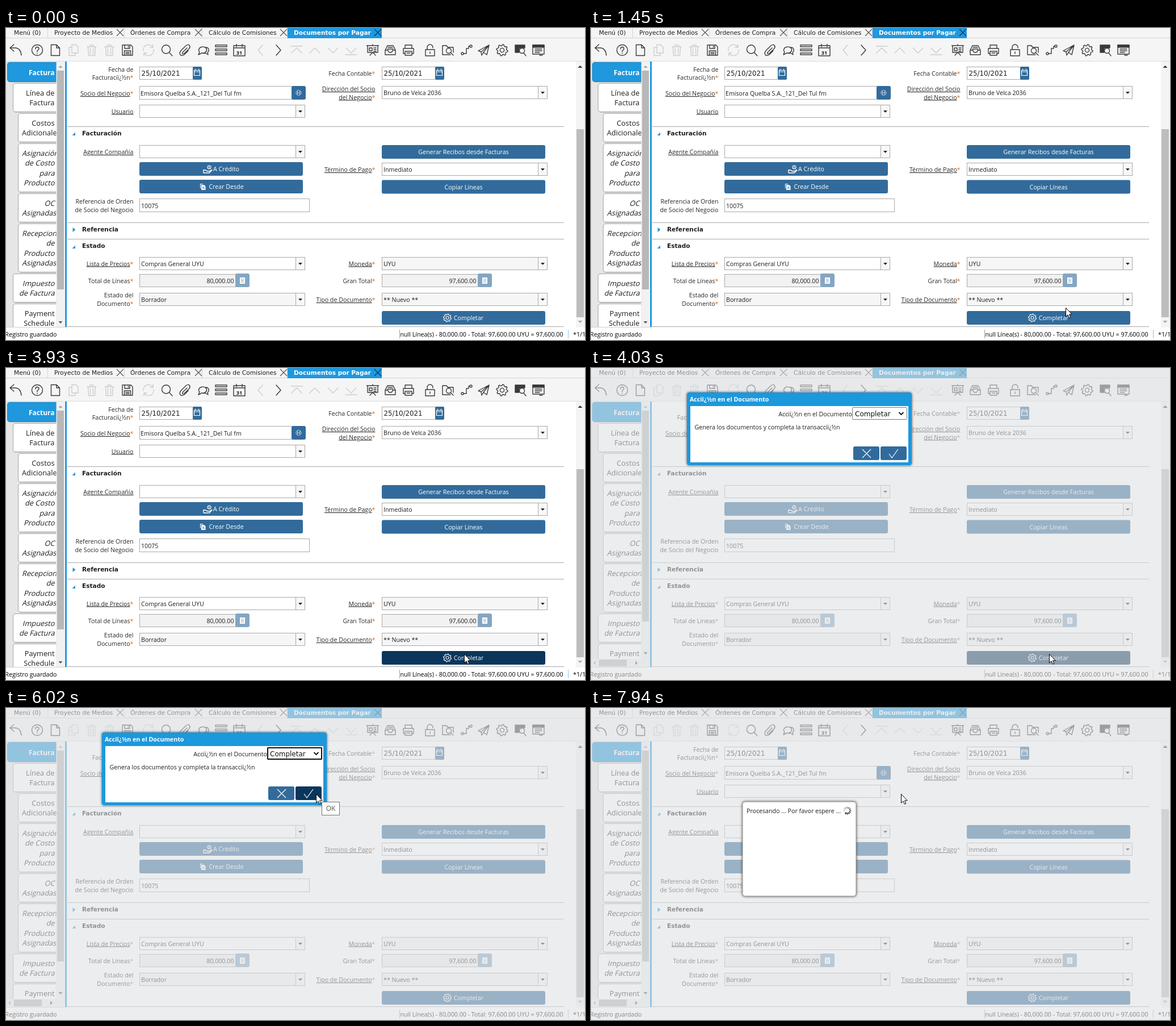
These frames come from a looping animation (1020 px wide and 549 px high, 8 s). An HTML page:

```html
<!DOCTYPE html>
<html lang="es">
<head>
<meta charset="utf-8">
<title>Documentos por Pagar</title>
<style>
html, body { margin: 0; width: 100%; height: 100%; overflow: hidden; background: #fff; }
svg { display: block; width: 1020px; height: 549px; }
text { font: 10.67px "Open Sans", "Noto Sans", sans-serif; fill: #1e1e1e; }
.dv { font-family: "DejaVu Sans", sans-serif; }
.ic path { stroke-width: 1.4; stroke-linejoin: round; stroke-linecap: round; }
</style>
</head>
<body>
<svg id="stage" viewBox="0 0 1020 549"></svg>
<script>
const BLUE = '#1f98dd', BTN = '#326b9b', HOVER = '#0b365c', PRESS = '#1b4c78';
const LINE = '#a9a9a9', INK = '#3a3a3a';

// ---- drawing helpers, each returns SVG markup ----
const rect = (x, y, w, h, fill, more = '') =>
  `<rect x="${x}" y="${y}" width="${w}" height="${h}" fill="${fill}" ${more}/>`;
const frame = (x, y, w, h, fill = '#fff', stroke = LINE) =>
  rect(x + .5, y + .5, w - 1, h - 1, fill, `stroke="${stroke}"`);
const path = (d, more = '') => `<path d="${d}" ${more}/>`;
const stroke = (d, color, w = 1) => path(d, `fill="none" stroke="${color}" stroke-width="${w}"`);
const circle = (x, y, r) => `M${x - r} ${y}a${r} ${r} 0 1 0 ${2 * r} 0a${r} ${r} 0 1 0 ${-2 * r} 0`;
const at = (x, y, body, more = '') => `<g transform="translate(${x} ${y})" ${more}>${body}</g>`;
const group = (id, body) => `<g id="${id}">${body}</g>`;

// italic text is the upright face, slanted
function text(x, y, str, o = {}) {
  const style = (o.size ? `font-size:${o.size}px;` : '') + (o.bold ? 'font-weight:700;' : '') +
    (o.fill ? `fill:${o.fill};` : '');
  return `<text transform="translate(${x} ${y})${o.italic ? ' skewX(-14)' : ''}" class="${o.dv ? 'dv' : ''}" text-anchor="${o.anchor || 'start'}" style="${style}">${str}</text>`;
}

function label(x, y, str, link, star) {
  const body = link ? `<tspan text-decoration="underline">${str}</tspan>` : str;
  return text(x, y, body + (star ? '<tspan style="fill:#e0701e">*</tspan>' : ''), { anchor: 'end', fill: '#2a2a2a' });
}

const arrow = (x, y, s, dir, fill) =>
  at(x, y, path(`M${-s} ${-s / 2}H${s}L0 ${s / 2}Z`, `fill="${fill}" transform="rotate(${dir})"`));

function combo(x, y, str = '', fill = '#fff') {
  return frame(x, y, 292, 23, fill) + frame(x + 275, y, 17, 23, '#f8f8f8') +
    arrow(x + 283.5, y + 12, 3.5, 0, '#111') + text(x + 3, y + 16, str);
}

const button = (x, y, str, mid = x + 144, id = '') =>
  rect(x, y, 288, 24, BTN, `rx="3" ${id && `id="${id}"`}`) +
  text(mid, y + 16, str, { fill: '#fff', anchor: 'middle' });

function gear(r) {
  let d = '';
  for (let i = 0; i < 32; i++) {
    const a = (i + .5) * Math.PI / 16, k = i % 4 < 2 ? r : r * .78;
    d += (i ? 'L' : 'M') + (k * Math.cos(a)).toFixed(1) + ' ' + (k * Math.sin(a)).toFixed(1);
  }
  return d + 'Z' + circle(0, 0, r * .36);
}

const close = (x, color) => stroke(`M${x - 6} 2l12 12m0-12l-12 12`, color, 1.2);

// ---- top tabs ----
function tabs() {
  const names = [[14, 'Menú (0)'], [85, 'Proyecto de Medios'], [219, 'Órdenes de Compra'], [357, 'Cálculo de Comisiones']];
  return rect(0, 0, 1020, 18, '#f5f5f5') + stroke('M0 17.5H1020', '#d5d5d5') +
    stroke('M73.500 0V17M208.500 0V17M345.500 0V17M495.500 0V17', '#d5d5d5') +
    names.map(([x, s]) => text(x, 12, s, { dv: 1, size: 10.6 })).join('') +
    [201, 339, 489].map(x => close(x, '#555')).join('') +
    rect(496, 0, 166, 18, BLUE) +
    text(507, 12, 'Documentos por Pagar', { dv: 1, bold: 1, size: 10.55, fill: '#fff' }) + close(655, '#0b365c');
}

// ---- toolbar: x, outline, disabled, solid part ----
const TRASH = 'M-8-6H8M-3-6V-9H3V-6M-6.500-6L-5.500 9.500H5.500L6.500-6M-2.500-3V7M2.500-3V7';
const UP = 'M-9 5L0-4L9 5', DOWN = 'M-9-4L0 5L9-4';
const ICONS = [
  [17, 'M-3-10L-10-4L-3 2M-10-4H0Q9-3 10 9'],
  [55, circle(0, 0, 9.5) + 'M-3-2Q-3-5.500 0-5.500T3-2.500Q3-1 0 1V3M0 5.500V6'],
  [87, 'M-7.500-9.500H2L7.500-4V9.500H-7.500ZM2-9.500V-4H7.500'],
  [119, 'M-3-9.500H4L8-5.500V5H-3ZM-3-5H-8V9.500H3V5', 1],
  [151, TRASH, 1], [182, TRASH, 1],
  [214, 'M-9-9H6L9-6V9H-9ZM-5-9V-3H4V-9M1.500-7V-5M-5.500 9V1H5.500V9M-3 4H3M-3 6.500H3'],
  [251, 'M-9 1A9 9 0 0 1 7-6M9-1A9 9 0 0 1-7 6M8-10V-5H3M-8 10V5H-3', 1],
  [283, circle(-1, -1.5, 7.5) + 'M4.500 4L10 10'],
  [315, 'M4-4L-4 4Q-5 6-3.500 6.500T0 5L8-3Q10-6 8-8.500T2-8L-7 1Q-10 5-8 8T-1 8L6 1'],
  [347, 'M-8 8L-6 3A7 5.500 0 1 1-2 5ZM5-5A5.500 5 0 0 1 8 4L9 8L4 5Q0 6-1 5'],
  [379, 'M-10-9H10V-6H-10ZM-10-2H10V1H-10ZM-10 5H10V8H-10Z'],
  [411, 'M-10-8H10V10H-10ZM-10-4H10M-5-10.500V-6M5-10.500V-6'],
  [449, 'M3-9L-5 0L3 9', 1], [480, 'M-4-9L4 0L-4 9'],
  [512, 'M-10-7H10' + UP, 1], [544, UP, 1], [576, DOWN, 1], [608, 'M-10 8H10' + DOWN, 1],
  [646, 'M-9-8H9V4H-9ZM-10.500-8H10.500M-5 9L0 4L5 9M0-10V-8M-6-4H-1V1H-6ZM2-4H6M2-1H6M2 2H6'],
  [677, 'M-9 0L-5-8H5L9 0V8H-9ZM-9 0H-4Q-4 4 0 4T4 0H9M-4-5H4M-5-2H5'],
  [709, 'M-6-3V-9H6V-3M-6 6H-9V-3H9V6H6M-6 2H6V9H-6ZM-3 5H3'],
  [747, 'M-8-1H8V10H-8ZM-5-1V-5A5 5 0 0 1 5-5V-4M0 3V6'],
  [779, 'M-10 8V-8H-3L-1-5H9V4M-10 8H4' + circle(1, 1, 4.5) + 'M4.500 4.500L9 9'],
  [811, circle(-7, 6, 2) + circle(8, -7, 2) + 'M-5 6H0V-3H4V-7H6'],
  [842, 'M-10 1L9-9L5 8L-1 4L-4 9L-5 3ZM-5 3L9-9L-1 4'],
  [874, gear(10)],
  [906, circle(3, 1, 4.5) + 'M6 5L10 10', 0, 'M-9-9H8V-4H-2V4H-9Z'],
  [938, 'M-10-9H10V7H-10ZM-6-2H6M-6 1H6M-6 4H2M2 9H7', 0, 'M-10-9H10V-5H-10Z'],
];
function icon([x, d, off, solid]) {
  const ink = off ? '#cdcdcd' : INK;
  return at(x, 39, path(d, 'fill="none"') + (solid ? path(solid, `fill="${ink}"`) : ''), `stroke="${ink}"`);
}
function toolbar() {
  return rect(0, 18, 1020, 41, '#f5f5f5') + stroke('M0 58.500H1020', '#dcdcdc') +
    `<g class="ic">${ICONS.map(icon).join('')}</g>` +
    text(411, 46.5, '31', { bold: 1, size: 9, anchor: 'middle' });
}

// ---- side panel: x, y, height, baseline, lines, italic ----
const SIDE = [
  [12, 97, 51, 119, ['Línea de', 'Factura']],
  [21, 150, 51, 172, ['Costos', 'Adicionales']],
  [21, 203, 86, 225, ['Asignación', 'de Costo', 'para', 'Producto'], 1],
  [21, 291, 51, 313, ['OC', 'Asignadas'], 1],
  [21, 344, 86, 366, ['Recepciones', 'de', 'Producto', 'Asignadas'], 1],
  [12, 432, 51, 454, ['Impuesto', 'de Factura'], 1],
  [12, 485, 51, 507, ['Payment', 'Schedule']],
];
function side() {
  const tab = (x, y, h, fill, line) =>
    path(`M95 ${y + .5}H${x + 5}q-4.500 0-4.500 4.500V${y + h - 5}q0 4.500 4.500 4.500H95Z`, `fill="${fill}" stroke="${line}"`);
  const long = /^(Adic|Asig|Recep)/;
  return `<g clip-path="url(#sideClip)">` + rect(0, 59, 89, 468, '#e6e6e6') +
    tab(3, 61, 35, '#bbb', '#ccc') + tab(2, 60, 35, BLUE, '#1784c4') +
    text(85.5, 83, 'Factura', { bold: 1, size: 12, fill: '#fff', anchor: 'end' }) +
    SIDE.map(([x, y, h, base, lines, italic]) => tab(x + 1, y + 1, h, '#ccc', '#c6c6c6') + tab(x, y, h, '#fff', '#a4a4a4') +
      lines.map((s, i) => long.test(s)
        ? text(28, base + i * 17.4, s, { size: 12.8, italic })
        : text(85.5, base + i * 17.4, s, { size: 12.8, italic, anchor: 'end' })).join('')).join('') + '</g>' +
    rect(89, 59, 14, 468, '#f1f1f1') + arrow(96, 68, 3.5, 180, '#999') +
    group('tallBar', rect(90, 75, 12, 385, '#b8b8b8') + arrow(96, 518, 3.5, 0, '#444')) +
    group('shortBar', rect(90, 75, 12, 371, '#b8b8b8') + arrow(96, 502, 3.5, 0, '#444') +
      rect(0, 512, 103, 15, '#f1f1f1') + rect(14, 513, 49, 12, '#b8b8b8') +
      arrow(6, 519, 3.5, 90, '#999') + arrow(80, 519, 3.5, 270, '#444')) +
    rect(104, 59, 3, 468, BLUE);
}

// ---- form ----
function dateField(x) {
  return frame(x, 68, 95, 23) + text(x + 3.5, 84, '25/10/2021', { dv: 1, size: 11.8 }) + rect(x + 94, 68, 16, 23, BTN, 'rx="2"') +
    stroke(`M${x + 96.5} 74.500h10v9h-10zm0 2.500h10m-8-5v2m6-2v2`, '#fff', 1.2);
}
function sum(x, str) {
  return frame(x, 433, 170, 23, '#f2f2f2') + text(x + 166.5, 449, str, { anchor: 'end' }) +
    rect(x + 169, 432, 25, 24, '#84a6c3', 'rx="3"') + rect(x + 177, 439, 9, 11, '#fff') +
    stroke(`M${x + 179} 442h5m-5 2.500h5m-5 2.500h5`, '#84a6c3', 1);
}
const title = (y, str) => text(134, y, str, { dv: 1, bold: 1, size: 10.55 });
function form() {
  const GREY = '#f6f6f6', L = 224.5, R = 650.5;
  return label(L, 76.5, 'Fecha de') + label(L, 91, 'Facturaciï¿½n', 0, 1) + dateField(235) +
    label(R, 84, 'Fecha Contable', 0, 1) + dateField(662) +
    label(L, 119, 'Socio del Negocio', 1, 1) + frame(235, 102, 270, 24) + text(237, 118.5, 'Emisora Quelba S.A._121_Del Tul fm') +
    rect(503, 102, 25, 24, BTN, 'rx="3"') + stroke(circle(515.5, 114, 4.5) + 'M513.500 111v6m4-6v6m-4-3h4', '#c9dbea', 1) +
    label(R, 111, 'Dirección del Socio', 1) + label(R, 125.5, 'del Negocio', 1, 1) + combo(662, 102, 'Bruno de Velca 2036') +
    label(L, 150.5, 'Usuario', 1) + combo(235, 135) +
    stroke('M108 173.500H983M108 342.500H983M108 371.500H983M108 525.500H983', LINE) +
    path('M122 183.500V189H116.500ZM122 382.500V388H116.500ZM117.500 351V359L122.500 355Z', `fill="${BLUE}"`) +
    title(189, 'Facturación') + title(358, 'Referencia') + title(387, 'Estado') +
    label(L, 222, 'Agente Compañía', 1) + combo(235, 206) + button(662, 206, 'Generar Recibos desde Facturas') +
    button(235, 236, 'A Crédito', 388) + stroke('M348 250h3l4 2h4l4-3M348 255h10l5-5M348 249v6', '#fff', 1.4) +
    stroke(circle(358, 245, 3) + 'M358 243v4', '#fff', 1.1) +
    label(R, 253, 'Término de Pago', 1, 1) + combo(662, 237, 'Inmediato') +
    button(235, 267, 'Crear Desde', 388) + path('M342 274h5v1h-4v7h-1zM344 276h5l2.500 2.500V285H344z', 'fill="#fff"') +
    stroke('M346 280h3m-3 2h4', BTN) + button(662, 267.5, 'Copiar Líneas') +
    label(L, 309, 'Referencia de Orden') + label(L, 323.5, 'de Socio del Negocio') +
    frame(235, 300, 300, 24) + text(238, 316.5, '10075') +
    label(L, 418.5, 'Lista de Precios', 1, 1) + combo(235, 403, 'Compras General UYU') +
    label(R, 418.5, 'Moneda', 1, 1) + combo(662, 403, 'UYU', GREY) +
    label(L, 449, 'Total de Líneas', 0, 1) + sum(235, '80,000.00') +
    label(R, 449, 'Gran Total', 0, 1) + sum(662, '97,600.00') +
    label(L, 474, 'Estado del') + label(L, 488.5, 'Documento', 0, 1) + combo(235, 466, 'Borrador', GREY) +
    label(R, 482, 'Tipo de Documento', 1, 1) + combo(662, 466, '** Nuevo **', GREY) +
    button(662, 498, 'Completar', 815, 'complete') + at(777.5, 510, stroke(gear(7), '#fff', 1.1)) +
    rect(1004, 59, 16, 468, '#f4f4f4') + rect(1005, 178, 13, 331, '#bdbdbd') +
    arrow(1011.5, 68, 4, 180, '#333') + arrow(1011.5, 517, 4, 0, '#aaa');
}
function status() {
  return rect(0, 527, 1020, 22, '#fff') + stroke('M0 526.500H108', '#d0d0d0') +
    text(89.5, 543, 'Registro guardado', { anchor: 'end', fill: '#000' }) +
    stroke('M693.500 531V546', '#999') + stroke('M990.500 531V546', '#8ec4e4') +
    text(981.5, 543, 'null Línea(s) - 80,000.00 - Total: 97,600.00 UYU = 97,600.00', { anchor: 'end', fill: '#000' }) +
    text(999, 543, '*1/1', { fill: '#000' });
}

// ---- overlays ----
function dialog() {
  return rect(169, 43, 396, 128, BLUE, 'rx="4" filter="url(#shade)"') + rect(175, 67, 384, 99, '#fff') +
    text(174, 59, 'Acciï¿½n en el Documento', { bold: 1, fill: '#fff' }) +
    text(460, 85, 'Acciï¿½n en el Documento', { anchor: 'end' }) +
    rect(460.5, 69.5, 96, 21, '#fff', 'stroke="#767676" rx="1"') +
    group('focus', rect(461, 70, 95, 20, 'none', 'stroke="#101010" stroke-width="2" rx="1"')) +
    text(465, 85, 'Completar', { dv: 1, size: 12, fill: '#111' }) + stroke('M542.500 78l4 4l4-4', '#111', 1.8) +
    text(182.5, 108, 'Genera los documentos y completa la transacciï¿½n') +
    rect(462, 138, 46, 24, BTN, 'rx="3"') + stroke('M478 143l15 15m0-15l-15 15', '#fff', 1.2) +
    rect(510, 138, 46, 24, BTN, 'rx="3" id="accept"') + stroke('M525 151l5 7l11-15', '#fff', 1.2);
}
function waiting() {
  let spokes = '';
  for (let i = 0; i < 12; i++)
    spokes += path('M0-3.700V-7', `stroke="#000" stroke-width="1.7" transform="rotate(${i * 30})" opacity="${(.1 + .9 * i / 11).toFixed(2)}"`);
  return rect(267, 165, 200, 166, '#fff', 'rx="4" stroke="#8b8b8b" filter="url(#shade)"') +
    text(274, 184.5, 'Procesando ... Por favor espere ...') + at(451.5, 180.5, group('spin', spokes));
}
const tip = () => frame(556, 165, 32, 24, '#fff', '#767676') + text(572, 181, 'OK', { size: 12, anchor: 'middle', fill: '#575757' });
const pointer = path('M.5 .5V16L4 12.700L6.400 18.200L8.800 17.200L6.500 11.900H11.300Z', 'fill="#fff" stroke="#000"');

const stage = document.getElementById('stage');
stage.innerHTML = `<defs><clipPath id="sideClip"><rect y="59" width="88.500" height="468"/></clipPath>
  <filter id="shade" x="-10%" y="-10%" width="120%" height="120%"><feDropShadow dx="0" dy="0" stdDeviation="2" flood-color="#000" flood-opacity=".7"/></filter></defs>` +
  rect(0, 0, 1020, 549, '#fff') + tabs() + toolbar() + side() + form() + status() +
  group('mask', rect(0, 0, 1020, 549, '#e0e1e3', 'opacity=".6"')) +
  group('dialog', dialog()) + group('wait', waiting()) + group('tip', tip()) + group('pointer', pointer);

// ---- motion ----
// pointer moves: start, end, steps, then the points passed at even shares of the move
const MOVES = [
  [570, 700, 3, [1022, 549], [1004, 540], [985, 531], [1011, 537]],
  [960, 1450, 8, [1011, 537], [924, 515], [836, 492]],
  [2130, 2410, 5, [836, 492], [816, 509], [803, 501]],
  [2940, 2940, 1, [803, 501], [807, 503]],
  [4400, 4680, 5, [807, 503], [653, 300], [500, 96]],
  [5020, 5290, 5, [500, 96], [516, 109], [528, 124], [540, 140], [547, 156], [546, 151]],
];
function pointerAt(t) {
  const move = MOVES.filter(m => t >= m[0]).pop();
  if (!move) return [1100, 600];
  const [from, to, n, ...pts] = move;
  const step = n > 1 ? Math.floor((t - from) / (to - from) * (n - 1) + 1e-6) + 1 : 1;
  const u = Math.min(1, step / n) * (pts.length - 1);
  const i = Math.min(Math.floor(u), pts.length - 2), f = u - i;
  return [0, 1].map(k => Math.round(pts[i][k] + (pts[i + 1][k] - pts[i][k]) * f));
}

const el = id => document.getElementById(id);
const show = (id, on) => el(id).setAttribute('display', on ? 'inline' : 'none');
const inside = ([x, y], l, t, r, b) => x >= l && x < r && y >= t && y < b;
const between = (t, a, b) => t >= a && t < b;

function draw(t) {
  const p = pointerAt(t), modal = t >= 4030;
  el('pointer').setAttribute('transform', `translate(${p})`);
  el('complete').setAttribute('fill', between(t, 3090, 3160) ? PRESS : inside(p, 662, 498, 950, 522) ? HOVER : BTN);
  el('accept').setAttribute('fill', inside(p, 510, 138, 556, 162) ? HOVER : BTN);
  show('mask', modal);
  show('tallBar', !modal);
  show('shortBar', modal);
  show('dialog', between(t, 4030, 6960));
  show('focus', between(t, 4470, 6210));
  show('tip', between(t, 6020, 6210));
  show('wait', t >= 6960);
  const turn = t < 7190 ? 0 : t < 7340 ? 1 : 2 + Math.floor((t - 7340) / 100);
  el('spin').setAttribute('transform', `rotate(${turn * 30})`);
}

function tick() {
  draw(performance.now() % 8000);
  requestAnimationFrame(tick);
}
tick();
</script>
</body>
</html>
```
